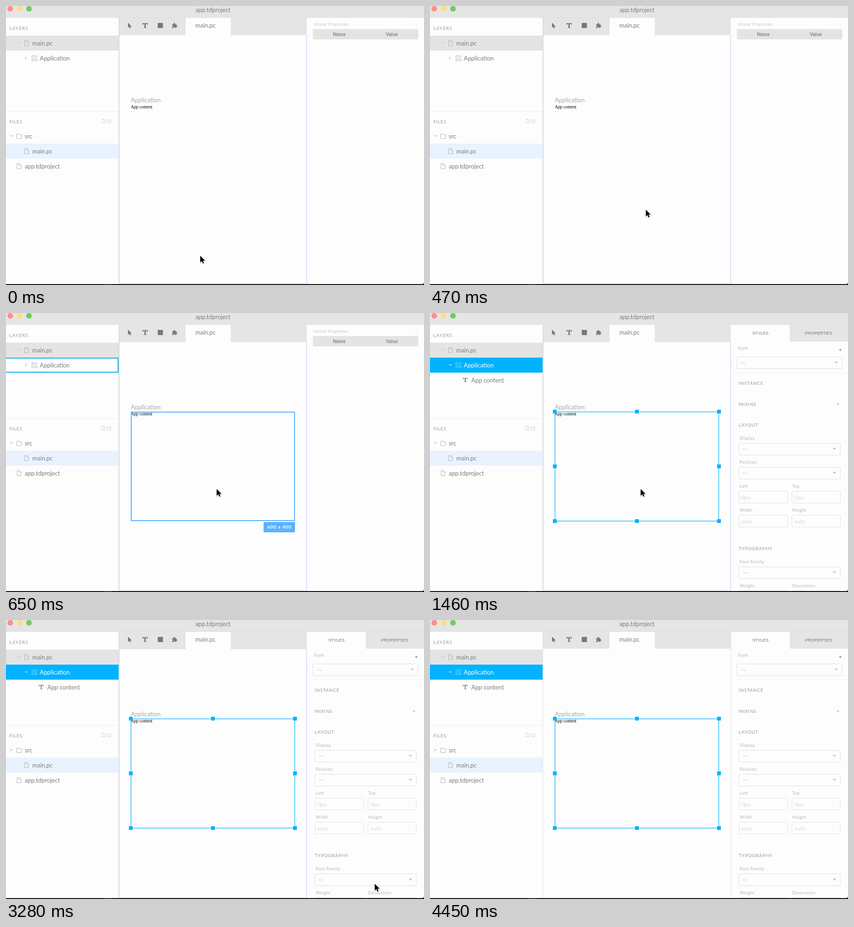
An HTML page for the animation above (4550 ms loop, 891x594 px).

```html
<!DOCTYPE html>
<html lang="en">
<head>
<meta charset="utf-8">
<title>Design editor</title>
<style>
  html, body { margin: 0; width: 100%; height: 100%; overflow: hidden; background: #fdfdfd; }
  svg { display: block; width: 100vw; height: 100vh; }
  text { white-space: pre; }
  .ui { font: 12.8px Lato, sans-serif; fill: #7d7d7d; }
  .head { font: 9.6px Lato, sans-serif; letter-spacing: .85px; fill: #9a9a9a; }
  .label { font: 9px Lato, sans-serif; letter-spacing: .6px; fill: #b3b3b3; }
  .hint { font: 12px Lato, sans-serif; fill: #dadada; }
  .page { font: 9.35px "Liberation Serif", serif; fill: #000; }
  .tab { font: 9px "Liberation Sans", sans-serif; fill: #777; text-anchor: middle; }
  .col { font: bold 10px "Liberation Sans", sans-serif; fill: #8a8a8a; text-anchor: middle; }
  .small { font: 9.6px "Liberation Sans", sans-serif; fill: #cbcbcb; }
  .size { font: bold 10px Lato, sans-serif; letter-spacing: .75px; fill: #fff; }
</style>
</head>
<body>
<svg id="stage" viewBox="0 0 891 594" preserveAspectRatio="none"></svg>
<script>
const LOOP = 4550;
const HOVER = 560, SELECT = 1460, SETTLE = 4450;
const BG = '#fdfdfd', BAR = '#e5e5e5', BLUE = '#00b2ff', HOVER_BLUE = '#5ab3ff';

// Cursor stops: time, x, y. It jumps from stop to stop and then leaves the stage.
const STOPS = [
  [0, 414, 531], [350, 435, 517], [470, 460, 433], [560, 452, 384], [650, 449, 374],
  [3080, 482, 381], [3190, 731, 521], [3280, 786, 561], [3360, 818, 580], [3450, -50, -50]
];

const rect = (x, y, w, h, fill, more = '') =>
  `<rect x="${x}" y="${y}" width="${w}" height="${h}" fill="${fill}" ${more}/>`;
const box = (x, y, w, h, color, width = 1, r = 0) =>
  rect(x, y, w, h, 'none', `rx="${r}" stroke="${color}" stroke-width="${width}"`);
const text = (x, y, cls, str, style = '') =>
  `<text x="${x}" y="${y}" class="${cls}" style="${style}">${str}</text>`;
const path = (d, fill, more = '') => `<path d="${d}" fill="${fill}" ${more}/>`;
const line = (d, color, width = 1) => path(d, 'none', `stroke="${color}" stroke-width="${width}"`);
const group = (id, body) => `<g id="${id}">${body}</g>`;

const caretDown = (x, y, color = '#d4d4d4', w = 4) =>
  path(`M${x - w} ${y - 2}h${2 * w}l${-w} ${w}z`, color);
const caretRight = (x, y) => path(`M${x - 2} ${y - 4}v8l4 -4z`, '#d4d4d4');
const plus = (x, y, color) => line(`M${x - 2.5} ${y}h5M${x} ${y - 2.5}v5`, color);

const fileIcon = (x, y, s = 1, color = '#b4b4b4') =>
  `<g transform="translate(${x} ${y}) scale(${s})">` +
  line('M.5 .5h5l3.5 3.5v7.5h-8.5zM5.5 .5v3.5h3.5', color) + '</g>';
const folderIcon = (x, y, s = 1, color = '#b4b4b4') =>
  `<g transform="translate(${x} ${y}) scale(${s})">` +
  line('M.5 9.5v-8q0 -1 1 -1h2.8l1.4 1.6h4.8q1 0 1 1v6.4q0 1 -1 1h-9q-1 0 -1 -1z', color) + '</g>';
const gridIcon = (x, y, color) =>
  [[0, 0], [7, 0], [0, 7], [7, 7]].map(([dx, dy], i) =>
    box(x + dx + .5, y + dy + .5, 4.2, 4.2, color, 1, i === 1 ? 2 : .5)).join('');
const slabT = (x, y, s = 1, color = '#777') =>
  path('M0 0h11v3.4h-1.2q-.2 -1.6 -1.6 -1.6h-1.3v6.4q0 .8 1.5 .8v1h-5.8v-1q1.5 0 1.5 -.8v-6.4h-1.3' +
    'q-1.4 0 -1.6 1.6h-1.2z', color, `transform="translate(${x} ${y}) scale(${s})"`);
const puzzle = path('M354 39h3.3q-1 -2.9 1.5 -3t1.5 3h2.9v2.6q1.9 -.9 1.9 1.2t-1.9 1.3v2.7h-2.8' +
  'q.6 -2 -1.2 -2t-1.3 2h-3.9v-2.9q2.3 .4 2.3 -1t-2.3 -1z', '#777');

const select = (x, y, w) =>
  box(x + .5, y + .5, w - 1, 25, '#dedede', 1, 2) +
  text(x + 9, y + 17, 'label', '--', 'font-size:11px;fill:#999') +
  caretDown(x + w - 13, y + 12.5, '#c4c4c4');
const input = (x, y, w, hint) =>
  box(x + .5, y + .5, w - 1, 25, '#e0e0e0', 1, 2) + text(x + 5.5, y + 17.5, 'hint', hint);
const pair = (y, left, right, hint) =>
  text(660, y, 'label', left) + text(772, y, 'label', right) +
  input(658, y + 7, 105, hint) + input(771, y + 7, 104, hint);

const titleBar =
  rect(0, 0, 891, 25, BAR) + rect(0, 24, 891, 1, '#dcdcdc') +
  ['#ff8f8b', '#ffdc7c', '#71cb63'].map((c, i) => `<circle cx="${9 + i * 20}" cy="6" r="6" fill="${c}"/>`).join('') +
  text(441.3, 12.5, 'ui', 'app.tdproject', 'text-anchor:middle');

const sidebar =
  text(7, 51, 'head', 'LAYERS', 'letter-spacing:1.3px') +
  rect(0, 63, 240, 32, '#e4e4e4') + caretDown(27.5, 79) + fileIcon(39, 73) + text(56, 83.5, 'ui', 'main.pc') +
  rect(0, 224, 240, 1, '#ececec') +
  text(7, 250, 'head', 'FILES') + fileIcon(204, 240, .75, '#c6c6c6') + folderIcon(215.5, 241.5, .7, '#b8b8b8') +
  caretDown(11.5, 277) + folderIcon(22, 272) + text(40, 281.5, 'ui', 'src') +
  rect(0, 293, 240, 32, '#e9f3ff') + fileIcon(39, 303) + text(56, 313.5, 'ui', 'main.pc') +
  fileIcon(23, 335) + text(40, 345.5, 'ui', 'app.tdproject');

const toolbar =
  rect(241, 25, 400, 36, BAR) +
  path('M260 35.5v11l2.6 -2.3 1.6 3.6 2 -.9 -1.6 -3.5h3.5z', '#777') +
  slabT(291, 36.5) + rect(323.5, 36, 11, 11, '#777') + puzzle +
  rect(383, 25, 96, 36, BG) + text(403.5, 45.5, 'ui', 'main.pc');

const frameActive =
  rect(240, 25, 2, 567, '#dcdcdc') + rect(241, 61, 400, 1, '#e2e2e2') + rect(383, 61, 96, 1, BG) +
  rect(640, 62, 2, 530, '#d5e3fa') + rect(242, 590.5, 399, 1.5, '#e6eaf0');
const frameIdle = rect(240, 25, 1, 567, '#dedede') + rect(641, 25, 1, 567, '#dedede');

const canvas =
  text(266, 205, 'ui', 'Application', 'fill:#a8a8a8') + text(266, 218, 'page', 'App content');

const layerClosed =
  caretRight(43, 111) + gridIcon(54.5, 105, '#b4b4b4') + text(72, 115.5, 'ui', 'Application');
const layerOpen =
  rect(0, 95, 240, 32, BLUE) + caretDown(43.5, 111, '#7fcdf2') + gridIcon(54.5, 105, '#8fdcff') +
  text(72, 115.5, 'ui', 'Application', 'fill:#fff') +
  slabT(70, 138, .93, '#999') + text(88, 147.5, 'ui', 'App content');

const hover =
  box(-3, 96, 242, 30, '#18b0ef', 2) + box(267, 211, 348, 231, HOVER_BLUE, 2) +
  rect(549, 445, 67, 22, HOVER_BLUE, 'rx="2"') + text(557, 459, 'size', '600 x 400');

const handles = [266, 441, 616].flatMap(x => [210, 326.5, 443].map(y =>
  x === 441 && y === 326.5 ? '' : rect(x - 4, y - 4, 8, 8, BLUE))).join('');
const selection = box(266.5, 210.5, 349, 232.5, BLUE, 1.2) + handles;

const globals =
  text(656, 42, 'small', 'Global Properties') + plus(874, 39, '#e2e2e2') +
  rect(654, 49, 225, 22, '#e4e4e4', 'rx="2"') +
  text(710.5, 64, 'col', 'Name') + text(822.5, 64, 'col', 'Value');

const inspector =
  rect(767, 25, 124, 36, BAR) +
  text(704.3, 46, 'tab', 'STYLES') + text(828.5, 46, 'tab', 'PROPERTIES') +
  text(656, 78, 'label', 'Style') + plus(874.5, 78.5, '#777') + select(654, 93, 225) +
  rect(642, 127, 249, 1, '#efefef') +
  text(658, 153, 'head', 'INSTANCE') +
  text(658, 198, 'head', 'MIXINS') + plus(870, 194, '#b0b0b0') +
  text(658, 242, 'head', 'LAYOUT') +
  text(660, 270, 'label', 'Display') + select(658, 277, 217) +
  text(660, 321, 'label', 'Position') + select(658, 328, 217) +
  pair(372, 'Left', 'Top', '0px') + pair(423, 'Width', 'Height', 'auto') +
  text(658, 505, 'head', 'TYPOGRAPHY') +
  text(660, 533, 'label', 'Font Family') + select(658, 540, 217) +
  pair(584, 'Weight', 'Decoration', '');

const floor =
  rect(0, 592, 891, 2, '#151515') + path('M891 588v4h-4q4 0 4 -4z', '#151515') +
  line('M209 593h4M215 593h3M220 593h4', '#777', .8);

const arrow = 'M0 .8v14.2l3.3 -3.1 2.3 5.2 2.4 -1 -2.2 -5.1h4.6z';
const cursor =
  path(arrow, '#000', 'opacity=".18" transform="translate(.6 1.4)" stroke="#000" stroke-width="1.6"') +
  path(arrow, '#000', 'stroke="#fff" stroke-width="1.6" paint-order="stroke" stroke-linejoin="round"');

const stage = document.getElementById('stage');
stage.innerHTML = rect(0, 0, 891, 594, BG) + titleBar + sidebar + toolbar + canvas +
  group('active', frameActive) + group('idle', frameIdle) +
  group('closed', layerClosed) + group('open', layerOpen) +
  group('globals', globals) + group('inspector', inspector) +
  group('hover', hover) + group('selection', selection) +
  floor + group('cursor', cursor);

const parts = Object.fromEntries([...stage.querySelectorAll('g[id]')].map(g => [g.id, g]));
const show = (id, on) => parts[id].setAttribute('display', on ? 'inline' : 'none');

function draw(t) {
  const selected = t >= SELECT, settled = t >= SETTLE;
  show('active', !settled);
  show('idle', settled);
  show('closed', !selected);
  show('globals', !selected);
  show('open', selected);
  show('inspector', selected);
  show('selection', selected);
  show('hover', t >= HOVER && !selected);
  const [, x, y] = STOPS.filter(s => s[0] <= t).pop();
  parts.cursor.setAttribute('transform', `translate(${x} ${y})`);
}

const start = performance.now();
function tick() {
  draw((performance.now() - start) % LOOP);
  requestAnimationFrame(tick);
}
tick();
</script>
</body>
</html>
```
